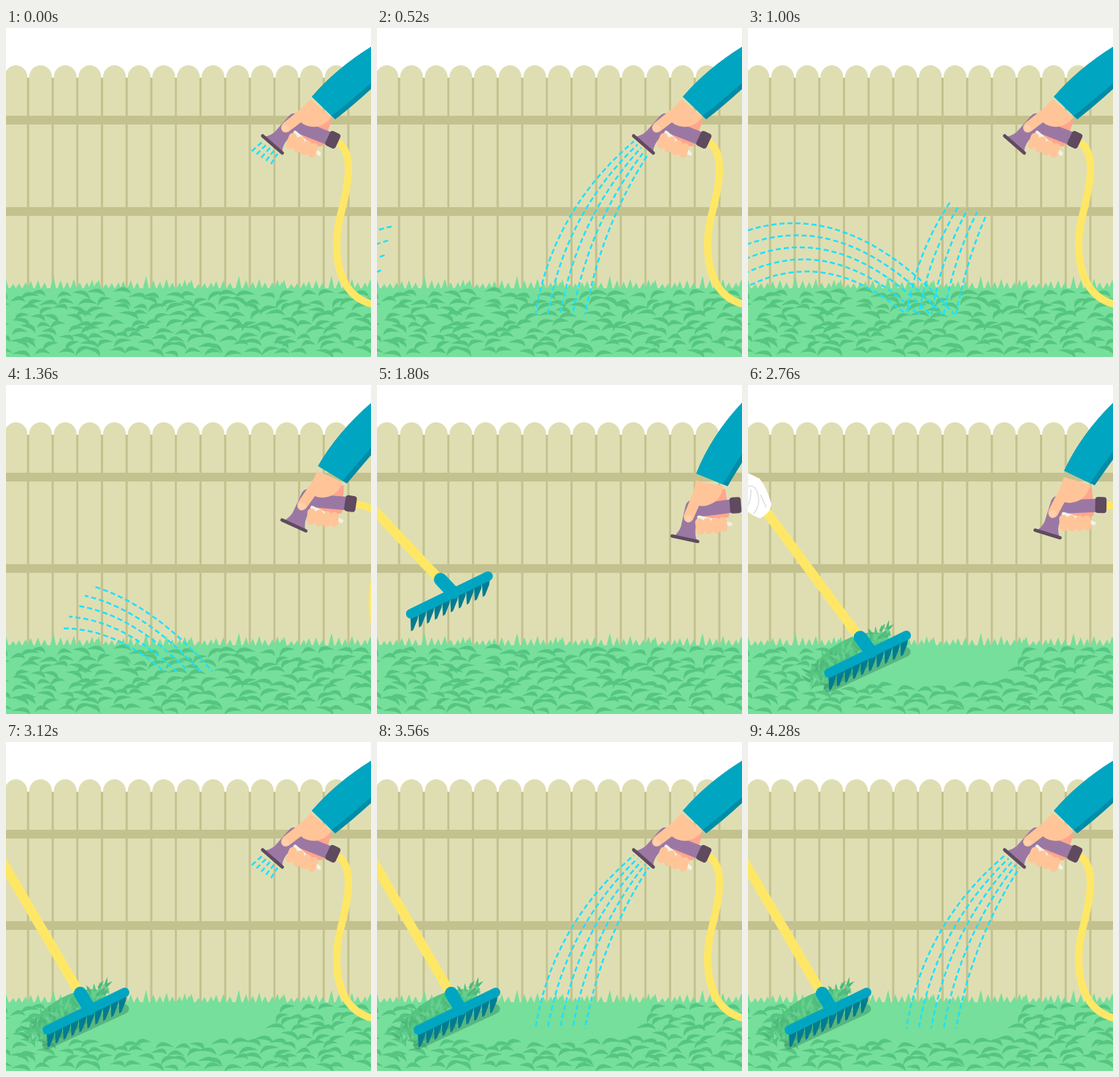
An HTML page for the animation above (4320 ms loop, 500 by 450 pixels).

```html
<!DOCTYPE html>
<html lang="en">
<head>
<meta charset="utf-8">
<title>Garden</title>
<style>
  html, body { margin: 0; width: 100%; height: 100%; overflow: hidden; background: #fff; }
  svg { display: block; width: 500px; height: 450px; }
</style>
</head>
<body>
<svg viewBox="0 0 500 450" xmlns="http://www.w3.org/2000/svg">
  <g id="fence"></g>
  <path id="lawn" fill="#76df9b"/>
  <g id="clippings" fill="#55c682"></g>
  <g id="water" fill="none" stroke="#1fe0ff" stroke-width="2.5"></g>

  <path id="hose" fill="none" stroke="#ffe766" stroke-width="10"/>
  <g id="hand">
    <path d="M436 118L446 127L439 146L424 136Z" fill="#ffa68d"/>
    <path d="M400 139L443 149L432 162L412 160Z" fill="#ffa68d"/>
    <path d="M354 149Q366 146 371 139L386 122Q392 114 400 118L406 127L447 143L440 160L402 145L389 149Q379 158 378 170Z" fill="#9b78a3"/>
    <path d="M351.5 147.5L378.5 171" stroke="#5f4a5f" stroke-width="4.6" stroke-linecap="round"/>
    <rect x="440" y="142" width="15.5" height="22" rx="4" fill="#5f4a5f" transform="rotate(25 448 153)"/>
    <path d="M396 143L429 172" stroke="#f4f1e8" stroke-width="5" stroke-linecap="round"/>
    <path d="M393 149L389 160M403 154L399 165M413 159L409 169M422 163L419 172" stroke="#ffc599" stroke-width="11" stroke-linecap="round"/>
    <path d="M417 97L446 122Q437 133 425 135Q412 136 404 129L387 142Q379 145 377 138Q376 133 381 129L401 113Q409 107 417 97Z" fill="#ffc599"/>
    <ellipse cx="383" cy="137" rx="5" ry="4.5" fill="#ffd0ab"/>
  </g>
  <path id="sleeveShade" fill="#008ba6"/>
  <path id="sleeve" fill="#00a6c1"/>

  <g id="pile"></g>
  <path id="rakeShadow" d="M273 414L379 365" stroke="#2f7f5c" stroke-width="13" stroke-linecap="round"/>
  <g id="rake">
    <g id="teeth" fill="#007c92"></g>
    <g id="handle" stroke-linecap="round">
      <path d="M-200 35L0 135Q40 162 90 185L76 214Q35 195 0 170L-200 75Z" fill="#ffc599"/>
      <path d="M-200 68L0 164Q35 190 79 208L76 214Q35 198 0 173L-200 78Z" fill="#ffa68d"/>
      <path d="M90 186L111 189Q124 197 137 216Q141 228 129 240Q112 240 96 230Q83 224 79 211Z" fill="#fff"/>
      <path d="M89 184L76 214" stroke="#008fa8" stroke-width="5" stroke-linecap="butt"/>
      <path d="M60 177L311 352" stroke="#ffe766" stroke-width="13"/>
      <path d="M96 206Q94 190 111 189Q124 197 137 216Q141 228 129 240Q112 240 96 230Q91 225 98 220Z" fill="#fff"/>
      <path d="M96 207Q108 195 117 212Q124 224 119 236M105 207Q110 224 107 231M120 210L132 223" fill="none" stroke="#dde0e3" stroke-width="1.6"/>
      <path d="M311 351L331 365" stroke="#00a6c1" stroke-width="18"/>
    </g>
    <path d="M273.5 394L379.5 342.5" stroke="#00a6c1" stroke-width="13" stroke-linecap="round"/>
  </g>
</svg>
<script>
const LOOP = 4320, STEP = 40;
const $ = id => document.getElementById(id);
const lerp = (a, b, p) => a + (b - a) * p;
const span = (t, a, b) => Math.min(1, Math.max(0, (t - a) / (b - a)));
const sine = p => (1 - Math.cos(Math.PI * p)) / 2;
const quad = p => p < .5 ? 2 * p * p : 1 - 2 * (1 - p) ** 2;

let seed = 41;
function rand(a = 0, b = 1) {
  seed = (seed * 16807) % 2147483647;
  return a + (b - a) * seed / 2147483647;
}

function add(parent, name, attrs) {
  const el = document.createElementNS('http://www.w3.org/2000/svg', name);
  for (const key in attrs) el.setAttribute(key, attrs[key]);
  return parent.appendChild(el);
}

function buildFence() {
  const fence = $('fence'), pitch = 33.75, dark = '#c3c28f';
  for (let i = 0; i < 15; i++) {
    const x = 13.6 + i * pitch;
    add(fence, 'path', { d: `M${x - 15.6} 360V67a15.6 16 0 0 1 31.2 0V360Z`, fill: '#dfdeb3' });
    add(fence, 'rect', { x: x + 15.1, y: 68, width: 3.6, height: 290, fill: dark });
  }
  for (const y of [120, 245]) add(fence, 'rect', { x: 0, y, width: 500, height: 12, fill: dark });
}

function buildLawn() {
  const tips = [[0, 345], [10, 351], [18, 350], [27, 349], [34, 347], [44, 346], [53, 349], [65, 340],
    [75, 346], [84, 348], [93, 344], [101, 349], [111, 349], [118, 345], [124, 348]];
  let d = 'M-5 450V356';
  for (let x = 0; x < 500; x += 127)
    for (const [dx, y] of tips) d += `L${x + dx - 4.5} 356L${x + dx} ${y - 1}L${x + dx + 3.5} 356`;
  $('lawn').setAttribute('d', d + 'H510V450Z');
}

function buildClippings() {
  const list = [];
  for (let row = 0; row < 9; row++)
    for (let col = 0; col < 20; col++) {
      const x = (col + row % 2 / 2) * 25.5 + rand(-8, 8), y = 362 + row * 10 + rand(-4, 4);
      const w = rand(10, 14), side = rand() < .5 ? -1 : 1, lean = side * rand(2, 8);
      const el = add($('clippings'), 'path', {
        d: `M${-w} 5Q${lean} -12 ${w} 4Q${lean} -1 ${-w} 5Z`,
        transform: `translate(${x} ${y}) rotate(${side * rand(0, 32)})`
      });
      list.push({ el, x, y });
    }
  return list;
}

function buildPile() {
  const pile = $('pile');
  add(pile, 'ellipse', { cx: -24, cy: 4, rx: 56, ry: 24, fill: '#55c682', transform: 'rotate(-28 -24 4)' });
  for (let i = 0; i < 150; i++) {
    const s = rand(-1, 1), len = rand(9, 18);
    const x = -24 + s * 52 + rand(-11, 11), y = 5 - s * 30 + rand(-13, 13);
    add(pile, 'path', {
      d: `M-2 0Q-2 ${-len / 2} 3 ${-len}Q3 ${-len / 2} 2 0Z`,
      fill: ['#55c682', '#4fb97b', '#66d08f'][i % 3],
      transform: `translate(${x} ${y}) rotate(${rand(-95, 50) - (s < -.5 ? 30 : 0)})`
    });
  }
}

function buildTeeth() {
  for (let i = 0; i < 10; i++) {
    const x = 274 + i * 10.9, y = 398 - i * 5.2;
    add($('teeth'), 'path', { d: `M${x - 1} ${y}L${x + 10} ${y - 5}L${x + 9} ${y + 3}L${x + 3} ${y + 18}L${x} ${y + 20}Z` });
  }
}

// Five strands from the nozzle and five arcs from beyond the left edge.
function buildWater() {
  const right = [], left = [];
  for (let i = 0; i < 5; i++) {
    const p = i / 4;
    const d = `M${lerp(352, 372, p)} ${lerp(155, 172, p)}Q${lerp(240, 308, p)} ${lerp(250, 269, p)} ${lerp(217, 285, p)} 392`;
    right.push(add($('water'), 'path', { d }));

    const px = lerp(62, 80, p), py = lerp(267, 333, p), x0 = -40, x1 = lerp(283, 217, p);
    const k = (392 - py) / (x1 - px) ** 2, y0 = py + k * (x0 - px) ** 2, cx = (x0 + x1) / 2;
    const arc = `M${x0} ${y0}Q${cx} ${y0 + 2 * k * (x0 - px) * (cx - x0)} ${x1} 392`;
    left.push(add($('water'), 'path', { d: arc }));
  }
  return { right, left };
}

// Each strand is trimmed by a share of its own length; dashes travel with the head.
function flow(strands, t, start, stop, duration) {
  const period = 11, dash = 7;
  for (const el of strands) {
    const total = el.getTotalLength(), travel = total * (t - start) / duration;
    const end = Math.min(travel, total), tail = Math.max(0, total * (t - stop) / duration);
    const visible = end > tail;
    el.style.display = visible ? '' : 'none';
    if (!visible) continue;
    const pattern = [0];
    let last = 0;
    for (let s = travel % period - period; s < end; s += period) {
      const a = Math.max(s, tail), b = Math.min(s + dash, end);
      if (b <= a) continue;
      pattern.push(a - last, b - a);
      last = b;
    }
    el.setAttribute('stroke-dasharray', [...pattern, 999].join(' '));
  }
}

const pivot = [492, 75];
function turn([x, y], degrees) {
  const a = degrees * Math.PI / 180, dx = x - pivot[0], dy = y - pivot[1];
  return [pivot[0] + dx * Math.cos(a) - dy * Math.sin(a), pivot[1] + dx * Math.sin(a) + dy * Math.cos(a)];
}

function drawArm(t) {
  const p = quad(span(t, 1080, 1600)) - quad(span(t, 2620, 3100));
  const angle = -29 * p;
  $('hand').setAttribute('transform', `rotate(${angle} ${pivot})`);

  // The cuff turns a little less than the wrist.
  const top = turn([419, 94], angle), bottom = turn([451, 125], angle);
  top[1] -= 6 * p;
  const inner = [0, 1].map(i => lerp(bottom[i], top[i], .15));
  const upper = `M${top}Q${lerp(453, 459, p)} ${lerp(54, 66, p)} 506 ${lerp(22, 18, p)}`;
  const lower = (end, dx, dy) => `V${end}Q${lerp(477, 491, p) + dx} ${lerp(105, 120, p) + dy} `;
  $('sleeveShade').setAttribute('d', `${upper}${lower(lerp(78, 97, p), 0, 0)}${bottom}Z`);
  $('sleeve').setAttribute('d', `${upper}${lower(lerp(70, 85, p), -5, -5)}${inner}Z`);

  const [hx, hy] = turn([452, 155], angle), s = 85 * p;
  $('hose').setAttribute('d', `M${hx} ${hy}C${470 + s} ${163 + 6 * p} ${472 + s} 190 ${466 + s} 222` +
    `S${452 + s} 270 ${453 + s} 302S${466 + s} 374 ${510 + s} 379`);
}

function drawRake(t) {
  const enter = sine(span(t, 1600, 2040)), pull = sine(span(t, 2260, 3010));
  const x = lerp(lerp(-71, 327, enter), 110, pull), y = lerp(226, 368, enter);
  const angle = lerp(lerp(55.5, 35, enter), 59.7, pull);
  const shown = t >= 1600 ? '' : 'none';
  const move = `translate(${x - 327} ${y - 368})`;

  $('rake').style.display = $('rakeShadow').style.display = shown;
  $('rake').setAttribute('transform', move);
  $('handle').setAttribute('transform', `rotate(${angle - 35} 331.5 365)`);
  $('rakeShadow').setAttribute('transform', move);
  $('rakeShadow').setAttribute('opacity', .42 * span(y, 345, 368));

  const size = Math.min(1, pull * 1.8);
  $('pile').style.display = size > 0 ? '' : 'none';
  $('pile').setAttribute('transform', `translate(${x} ${y}) scale(${size})`);

  for (const c of clippings) {
    const swept = pull > .03 && c.y < 408 && c.x > x - 15 - (c.y - 390) * 1.2 && c.x < 340 + (405 - c.y);
    c.el.style.display = swept ? 'none' : '';
  }
}

buildFence();
buildLawn();
const clippings = buildClippings();
buildPile();
buildTeeth();
const water = buildWater();

function draw(t) {
  drawArm(t);
  drawRake(t);
  if (t < 2000) flow(water.right, t, -40, 815, 460);
  else flow(water.right, t, 3080, LOOP, 460);
  flow(water.left, t, 420, 1120, 540);
}

function tick() {
  draw(Math.floor(performance.now() % LOOP / STEP) * STEP);
  requestAnimationFrame(tick);
}
tick();
</script>
</body>
</html>
```
